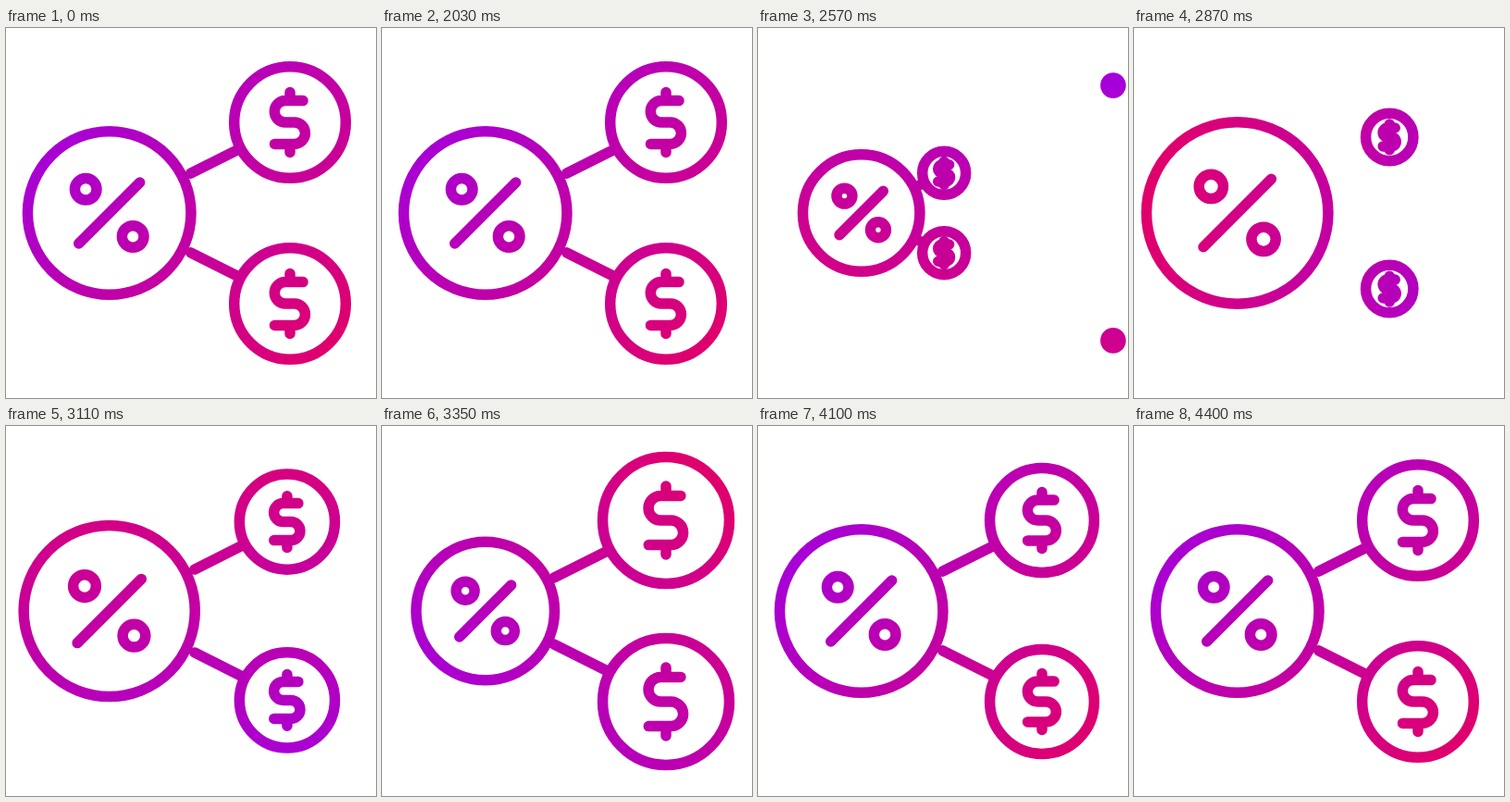
Recreate the animation shown at these times as an HTML page with a canvas. Size 400 by 400 pixels, loop 4.43 s.

```html
<!DOCTYPE html>
<html lang="en">
<head>
<meta charset="utf-8">
<title>Percent share</title>
<style>
  html, body { margin: 0; width: 100%; height: 100%; overflow: hidden; background: #fff; }
  canvas { display: block; width: 400px; height: 400px; }
</style>
</head>
<body>
<canvas id="stage" width="400" height="400"></canvas>
<script>
const ctx = document.getElementById('stage').getContext('2d');
const LOOP = 4430, START = 2020, END = 4400;
const HUB = { x: 111.7, y: 200 };
const COIN = { from: 118, reach: 189, rise: 98 };
const LINK = { x: 195.4, y: 98 };
const STROKE = 11.5;

const clamp = v => Math.min(1, Math.max(0, v));
const span = (t, a, b) => clamp((t - a) / (b - a));

// Cubic bezier easing with y1 = 0 and y2 = 1
function ease(x1, x2) {
  return x => {
    let lo = 0, hi = 1;
    for (let i = 0; i < 24; i++) {
      const s = (lo + hi) / 2, r = 1 - s;
      if (3 * x1 * s * r * r + 3 * x2 * s * s * r + s * s * s < x) lo = s; else hi = s;
    }
    return lo * lo * (3 - 2 * lo);
  };
}
const swift = ease(.34, .4), even = ease(.42, .58);
const easeOut = x => 1 - (1 - x) ** 2;

// Each key: [time, value, easing towards it]
function track(t, keys) {
  let [t0, v0] = keys[0];
  if (t <= t0) return v0;
  for (const [t1, v1, fn = swift] of keys.slice(1)) {
    if (t < t1) return v0 + (v1 - v0) * fn((t - t0) / (t1 - t0));
    t0 = t1;
    v0 = v1;
  }
  return v0;
}

const HUB_SCALE = [[START, 1], [2520, .7], [2997, 1.147], [3360, .847], [4150, 1]];
const COIN_SCALE = [[2350, 0], [2600, .395, easeOut], [2840, .42], [3435, 1.15], [3830, .825, even], [END, 1]];

function gradient(t) {
  const a = Math.PI * (.25 + 2 * swift(span(t, START, END)));
  const dx = 200 * Math.cos(a), dy = 200 * Math.sin(a);
  const cx = 222, cy = 198;
  const g = ctx.createLinearGradient(cx - dx, cy - dy, cx + dx, cy + dy);
  g.addColorStop(0, '#a400dc');
  g.addColorStop(1, '#e0006c');
  return g;
}

// Scales the geometry while the line weight stays constant
function shape(x, y, s, build, filled) {
  ctx.beginPath();
  ctx.setTransform(s, 0, 0, s, x, y);
  build();
  ctx.setTransform(1, 0, 0, 1, 0, 0);
  if (filled) ctx.fill();
  ctx.stroke();
}

const ring = (x, y, r) => {
  ctx.moveTo(x + r, y);
  ctx.arc(x, y, r, 0, 2 * Math.PI);
};
const segment = (x1, y1, x2, y2) => {
  ctx.moveTo(x1, y1);
  ctx.lineTo(x2, y2);
};

function dollar() {
  const r = 11.7, q = Math.PI / 2;
  ctx.moveTo(14, -2 * r);
  ctx.lineTo(-5, -2 * r);
  ctx.arc(-5, -r, r, -q, q, true);
  ctx.lineTo(4.7, 0);
  ctx.arc(4.7, r, r, -q, q);
  ctx.lineTo(-16.5, 2 * r);
  segment(0, -32.5, 0, -2 * r);
  segment(0, 2 * r, 0, 32.5);
}

function percent() {
  segment(-33, 33, 33, -33);
  ring(-25.5, -25.7, 11.8);
  ring(25.5, 25.5, 11.8);
}

function coins(dist, s) {
  if (s <= .001) return;
  for (const side of [-1, 1]) {
    const x = COIN.from + COIN.reach * dist, y = HUB.y + side * COIN.rise * dist;
    shape(x, y, s, () => ring(0, 0, 60.3), true);
    shape(x, y, s, dollar);
  }
}

function links(hubScale, grow) {
  if (grow <= 0) return;
  const from = .45 * hubScale, to = from + (.9 - from) * grow;
  for (const side of [-1, 1]) {
    shape(HUB.x, HUB.y - side * 1.3, 1, () => segment(
      LINK.x * from, side * LINK.y * from,
      LINK.x * to, side * LINK.y * to));
  }
}

function draw(t) {
  ctx.clearRect(0, 0, 400, 400);
  ctx.strokeStyle = gradient(t);
  ctx.fillStyle = '#fff';
  ctx.lineWidth = STROKE;
  ctx.lineCap = ctx.lineJoin = 'round';

  const hub = track(t, HUB_SCALE);
  links(hub, t < 2600 ? 1 - swift(span(t, START, 2340)) : swift(span(t, 2950, 3250)));

  // Incoming pair slides out from behind the hub
  if (t > 2350) coins(easeOut(span(t, 2352, 3222)), track(t, COIN_SCALE));

  shape(HUB.x, HUB.y, hub, () => ring(0, 0, 88.3), true);
  shape(HUB.x, HUB.y, hub, percent);

  // Outgoing pair flies off to the right
  if (t < 2603) {
    const away = span(t, 2030, 2603) ** 2.5;
    coins(1 + .47 * away, 1 - away);
  }
}

const origin = performance.now();
function tick() {
  draw((performance.now() - origin) % LOOP);
  requestAnimationFrame(tick);
}
tick();
</script>
</body>
</html>
```
